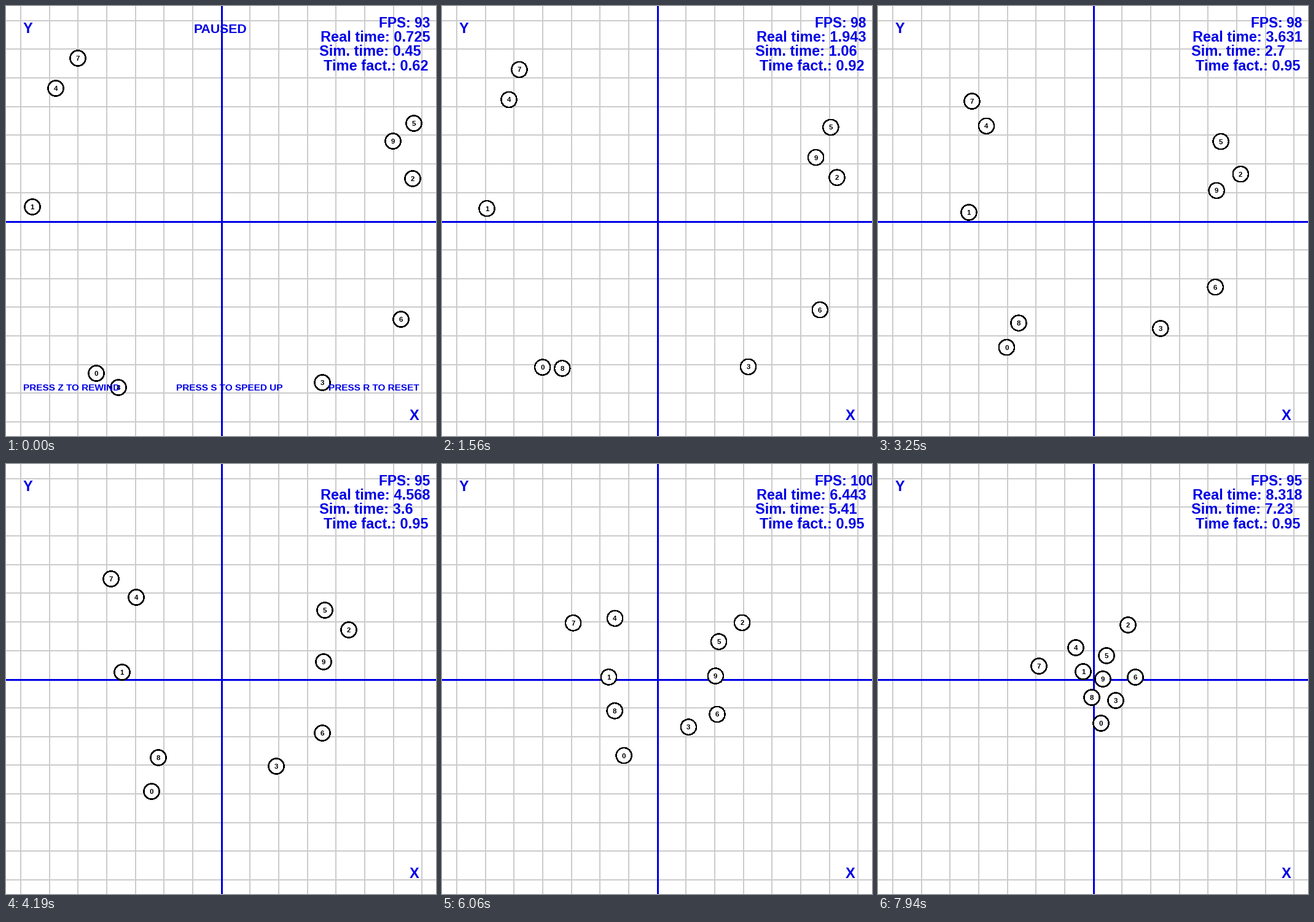
Write a matplotlib script that moves like this. It is 700 by 700 pixels and loops after 8000 ms.

```python
import numpy as np
import matplotlib.pyplot as plt
from matplotlib.animation import FuncAnimation
from matplotlib.patches import Circle

SIZE, FRAMES, INTERVAL = 700, 200, 40
STEP = 62.5   # ms between screen updates
LEAD = 35     # ms, keeps updates centred on the drawn frames
RAMP = 30     # steps until the balls reach cruising speed
BLUE, GREY = "#0000e6", "#cccccc"
PT = 0.72     # points per pixel at 100 dpi


def travel(k):
    """Distance-like clock: even acceleration, then constant speed."""
    return np.where(k < RAMP, k**2 / (2 * RAMP), k - RAMP / 2)


# Each ball: start, halfway, closing in, last position
KEYS = travel(np.array([0, 67, 110, 127]))
PATHS = np.array([
    [(147, 598), (237, 533), (324, 450), (363, 422)],
    [(43, 327), (189, 339), (302, 346), (334, 338)],
    [(662, 281), (558, 270), (455, 257), (407, 262)],
    [(515, 613), (440, 492), (391, 406), (387, 385)],
    [(81, 134), (212, 217), (304, 269), (322, 299)],
    [(664, 191), (519, 238), (419, 305), (372, 312)],
    [(643, 510), (515, 438), (429, 387), (419, 347)],
    [(117, 85), (171, 187), (234, 290), (262, 329)],
    [(183, 621), (248, 478), (304, 383), (348, 380)],
    [(630, 220), (517, 322), (412, 349), (366, 350)],
])
SLOPES = np.gradient(PATHS, KEYS, axis=1, edge_order=2)


def positions(k):
    """Cubic Hermite curve through the key points."""
    s = travel(k)
    i = min(np.searchsorted(KEYS, s, side="right") - 1, len(KEYS) - 2)
    h = KEYS[i + 1] - KEYS[i]
    u = (s - KEYS[i]) / h
    ease = u * u * (3 - 2 * u)
    return (PATHS[:, i] * (1 - ease) + PATHS[:, i + 1] * ease
            + h * u * (1 - u) * (SLOPES[:, i] * (1 - u) - SLOPES[:, i + 1] * u))


def trim(x, digits):
    return f"{x:.{digits}f}".rstrip("0").rstrip(".")


def readout(k):
    if k == 0:
        return 93, "0.725", "0.45", "0.62"
    fps = 97.5 + 2.5 * np.sin(2 * np.pi * (k - 22) / 60)
    real = 0.3805 + k * STEP / 1000
    sim = max(0.03 * k, 0.0604 * k - 0.445)
    factor = 0.95 - 0.33 * np.exp(-k / 10)
    return round(fps), trim(real, 3), trim(sim, 2), trim(factor, 2)


plt.rcParams["font.family"] = "Liberation Sans"
fig = plt.figure(figsize=(7, 7), dpi=100, facecolor="white")
ax = fig.add_axes([0, 0, 1, 1])
ax.set(xlim=(0, SIZE), ylim=(SIZE, 0))
ax.axis("off")


def label(x, y, text="", size=23.6, **kw):
    kw = {"color": BLUE, "zorder": 6, **kw}
    return ax.text(x, y, text, fontsize=size * PT, fontweight="bold",
                   va="baseline", **kw)


def cross(x, y, color, width, z):
    for line in (ax.axvline(x), ax.axhline(y)):
        line.set(color=color, linewidth=width * PT, zorder=z, antialiased=False)


for n in range(-7, 8):
    if n:
        shift = n * SIZE / 15
        cross(round(350.7 + shift), round(350.4 + shift), GREY, 2, 1)
cross(351, 351, BLUE, 3, 2)

label(28, 44, "Y")
label(657, 674, "X")
paused = [
    label(306, 44, "PAUSED", 21.3),
    label(28, 626, "PRESS Z TO REWIND", 15.4),
    label(277, 626, "PRESS S TO SPEED UP", 15.4),
    label(525, 626, "PRESS R TO RESET", 15.4),
]
FORMATS = ("FPS: {}", "Real time: {}", "Sim. time: {}", "Time fact.: {}")
lines = [label(607, 35, size=22.8), label(512, 58),
         label(510, 81), label(517, 105)]

balls = []
for n in range(len(PATHS)):
    ring = ax.add_patch(Circle((0, 0), 12.6, facecolor="white", edgecolor="black",
                               linewidth=1.3 * PT, antialiased=False, zorder=3 + n / 10))
    digit = label(0, 0, str(n), 11.5, color="black", ha="center", zorder=3.05 + n / 10)
    balls.append((ring, digit))


def draw(frame):
    k = int((frame * INTERVAL + LEAD) // STEP)
    for (ring, digit), (x, y) in zip(balls, positions(k)):
        ring.center = x, y
        digit.set_position((x, y + 4))
    for line, form, value in zip(lines, FORMATS, readout(k)):
        line.set_text(form.format(value))
    for text in paused:
        text.set_visible(k == 0)
    return []


anim = FuncAnimation(fig, draw, frames=FRAMES, interval=INTERVAL,
                     repeat=True, repeat_delay=0, blit=False)
plt.show()
```
